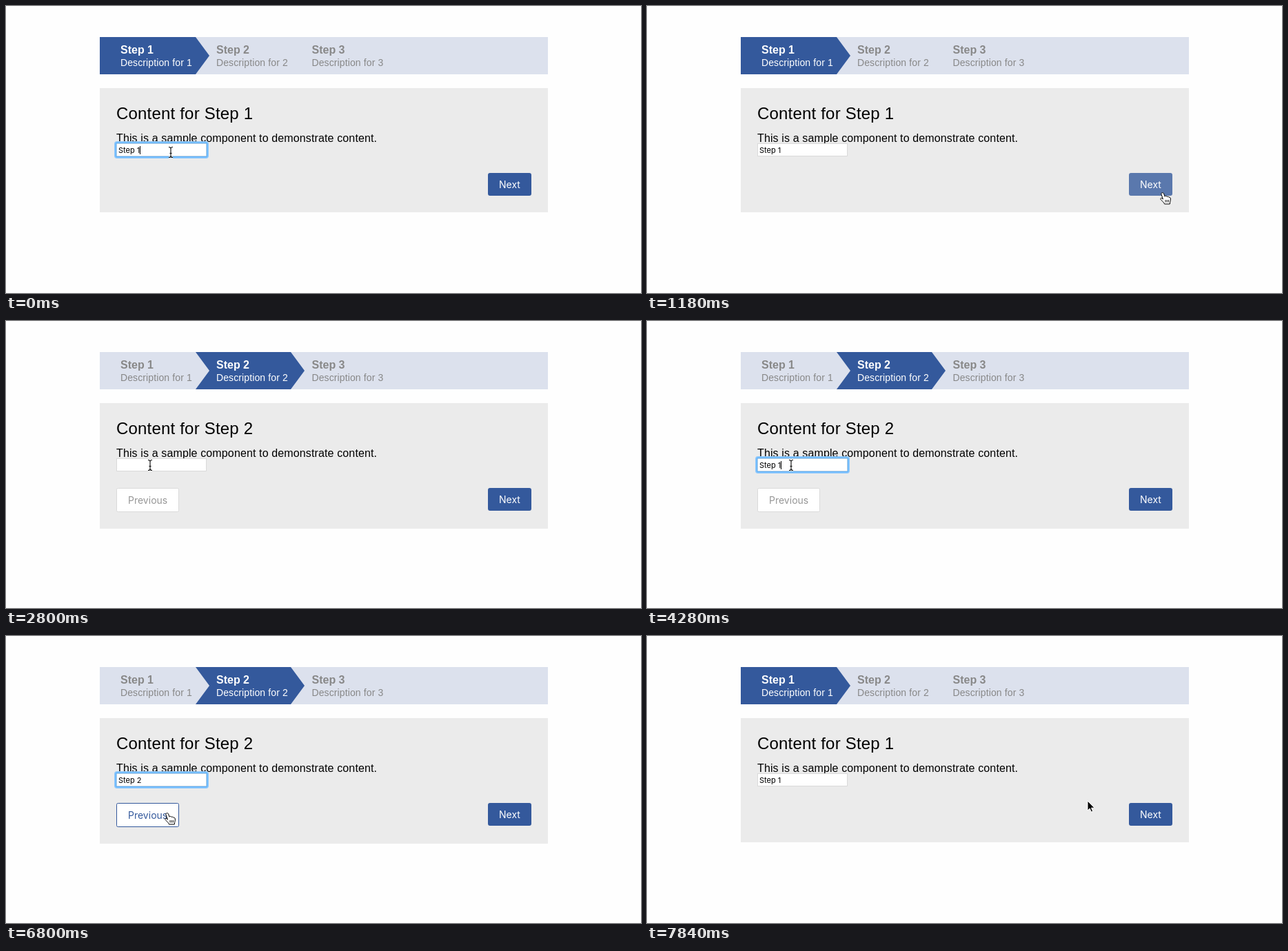
These frames come from a looping animation (921 by 416 pixels, 7990 ms). An HTML page:

```html
<!DOCTYPE html>
<html lang="en">
<head>
<meta charset="utf-8">
<title>Step wizard</title>
<style>
  html, body { margin: 0; width: 100%; height: 100%; overflow: hidden; background: #fefefe; }
  svg { display: block; width: 921px; height: 416px; }
  text { font: 16px "Liberation Sans", Arial, sans-serif; letter-spacing: .008em; white-space: pre; }
  .step { fill: #888; }
  .step.on { fill: #fff; }
  .step .name { font-weight: bold; letter-spacing: 0; }
  .step .desc { font-size: 14px; }
  #title { font-size: 24px; }
  .ui { font: 14px Inter, sans-serif; letter-spacing: 0; }
  #value { font-size: 11px; }
  .glyph { fill: #000; stroke: #fff; stroke-linejoin: round; }
</style>
</head>
<body>
<svg viewBox="0 0 921 416">
  <path fill="#dce1ed" d="M136 45H786V99H136Z"/>
  <path id="arrow" fill="#34599c"/>
  <g id="steps"></g>

  <rect id="panel" x="136" y="119" width="650" fill="#ebebeb"/>
  <text id="title" x="160" y="164"></text>
  <text x="160" y="197">This is a sample component to demonstrate content.</text>

  <rect x="160.5" y="199.5" width="130" height="18" fill="#fff" stroke="#dadada"/>
  <g id="ring" fill="none">
    <rect x="158.5" y="197.5" width="134" height="22" rx="2.5" stroke="#8ec8fb" stroke-width="3"/>
    <rect x="159.5" y="198.5" width="132" height="20" rx="1" stroke="#5fb2fb" stroke-width="1.5"/>
  </g>
  <text id="value" class="ui" x="163" y="213"></text>
  <rect id="caret" y="203" width="1" height="12"/>

  <g id="prev">
    <rect x="160.5" y="242.5" width="90" height="34" rx="2" fill="#fff"/>
    <text class="ui" x="177" y="265">Previous</text>
  </g>
  <rect id="next" x="699" y="242" width="63" height="33" rx="3"/>
  <text class="ui" x="715" y="264" fill="#fff" font-weight="500">Next</text>

  <g id="pointer">
    <g id="beam" fill="none">
      <path id="beamLine" d="M-3-7.5Q0-7.5 0-5.5Q0-7.5 3-7.5M0-6V6M-3 7.5Q0 7.5 0 5.5Q0 7.5 3 7.5M-1.5 1.5H1.5" stroke="#fff" stroke-width="2.4" stroke-opacity=".7"/>
      <use href="#beamLine"/>
      <path d="M-3-7.5Q0-7.5 0-5.5Q0-7.5 3-7.5M0-6V6M-3 7.5Q0 7.5 0 5.5Q0 7.5 3 7.5M-1.5 1.5H1.5" stroke="#000" stroke-width="1.1"/>
    </g>
    <path id="tip" class="glyph" d="M0 0V14L3.2 11L5.3 16L7.6 15L5.5 10.2H10Z"/>
    <g id="hand" stroke="#000" stroke-linejoin="round">
      <path fill="#fff" d="M-2.2 1.5C-2.2-.8 1-.8 1.6 1L3 5.2C3.4 4 5.8 4 6.2 5.6C6.8 4.8 8.6 5 9 6.4C9.8 5.9 11.2 6.3 11.3 8C11.6 11 10.5 12.5 10.3 16H2.5C1.8 13.5-.5 12-2.6 9.8C-4.2 8-2.5 6.8-1 7.8L.4 9Z"/>
      <path d="M4 10V13.5M6.2 10V13.5M8.4 10V13.5" stroke-width=".9"/>
    </g>
  </g>
</svg>
<script>
const LOOP = 7990;
const BLUE = [52, 89, 156], GREY = [150, 150, 150], LINE = [218, 218, 218], PALE = [235, 235, 235];
const $ = id => document.getElementById(id);
const mix = (a, b, k) => `rgb(${a.map((v, i) => Math.round(v + (b[i] - v) * k))})`;
const show = (id, on) => $(id).style.display = on ? '' : 'none';

// Pointer stops: time, shape, x, y
const moves = [
  [0, 'beam', 239, 212], [140, 'beam', 245, 213], [290, 'tip', 330, 230],
  [430, 'tip', 480, 245], [580, 'tip', 620, 257], [730, 'hand', 722, 267],
  [880, 'hand', 756, 271], [1030, 'hand', 748, 271],
  [1620, 'tip', 540, 226], [1770, 'beam', 237, 167], [1920, 'beam', 211, 192],
  [2060, 'tip', 211, 219], [2210, 'tip', 212, 221],
  [2510, 'beam', 211, 214], [2660, 'beam', 209, 209],
  [5770, 'tip', 213, 222], [5920, 'tip', 226, 238], [6060, 'hand', 243, 249],
  [6210, 'hand', 250, 258], [6360, 'hand', 239, 258], [6510, 'hand', 234, 257],
  [7100, 'tip', 234, 256], [7700, 'tip', 480, 246], [7840, 'tip', 639, 239]
];

// Changes to the form
const changes = [
  [0, { step: 1, value: 'Step 1', focus: true, caret: true, next: 0, prev: 0 }],
  [430, { caret: false }], [730, { next: .5 }], [880, { next: 1, caret: true }],
  [1180, { focus: false }],
  [1330, { step: 2, value: '' }],
  [1770, { next: .35 }], [1920, { next: 0 }],
  [2950, { focus: true }],
  [3240, { value: 'S' }], [3540, { value: 'St' }], [3690, { value: 'Ste' }],
  [3840, { value: 'Step' }], [3990, { value: 'Step ' }], [4280, { value: 'Step 1' }],
  [4880, { caret: false }], [5020, { caret: true, value: 'Step ' }],
  [5320, { value: 'Step 2' }],
  [5920, { caret: false }], [6060, { prev: .5 }], [6210, { prev: 1 }],
  [6360, { caret: true }], [6800, { caret: false }],
  [7100, { step: 1, value: 'Step 1', focus: false, prev: 0 }]
];

$('steps').innerHTML = [166, 305, 443.5].map((x, i) =>
  `<g class="step"><text class="name" x="${x}" y="69">Step ${i + 1}</text>
   <text class="desc" x="${x}" y="87">Description for ${i + 1}</text></g>`).join('');

function draw(t) {
  const s = Object.assign({}, ...changes.filter(c => c[0] <= t).map(c => c[1]));
  const [, shape, x, y] = moves.filter(m => m[0] <= t).pop();
  const second = s.step === 2;

  $('arrow').setAttribute('d', second
    ? 'M275 45H413L433 72L413 99H275L295 72Z'
    : 'M136 45H275L295 72L275 99H136Z');
  [...$('steps').children].forEach((g, i) => g.classList.toggle('on', i + 1 === s.step));
  $('panel').setAttribute('height', second ? 182 : 180);
  $('title').textContent = 'Content for Step ' + s.step;

  $('value').textContent = s.value;
  show('ring', s.focus);
  show('caret', s.focus && s.caret);
  const width = s.value ? $('value').getComputedTextLength() : 0;
  $('caret').setAttribute('x', Math.round(163 + width));

  $('next').setAttribute('fill', mix(BLUE, PALE, s.next * .21));
  show('prev', second);
  const [box, label] = $('prev').children;
  box.setAttribute('stroke', mix(LINE, BLUE, s.prev));
  label.setAttribute('fill', mix(GREY, BLUE, s.prev));

  for (const id of ['beam', 'tip', 'hand']) show(id, id === shape);
  $('pointer').setAttribute('transform', `translate(${x} ${y})`);
}

const start = performance.now();
(function tick() {
  draw((performance.now() - start) % LOOP);
  requestAnimationFrame(tick);
})();
</script>
</body>
</html>
```
